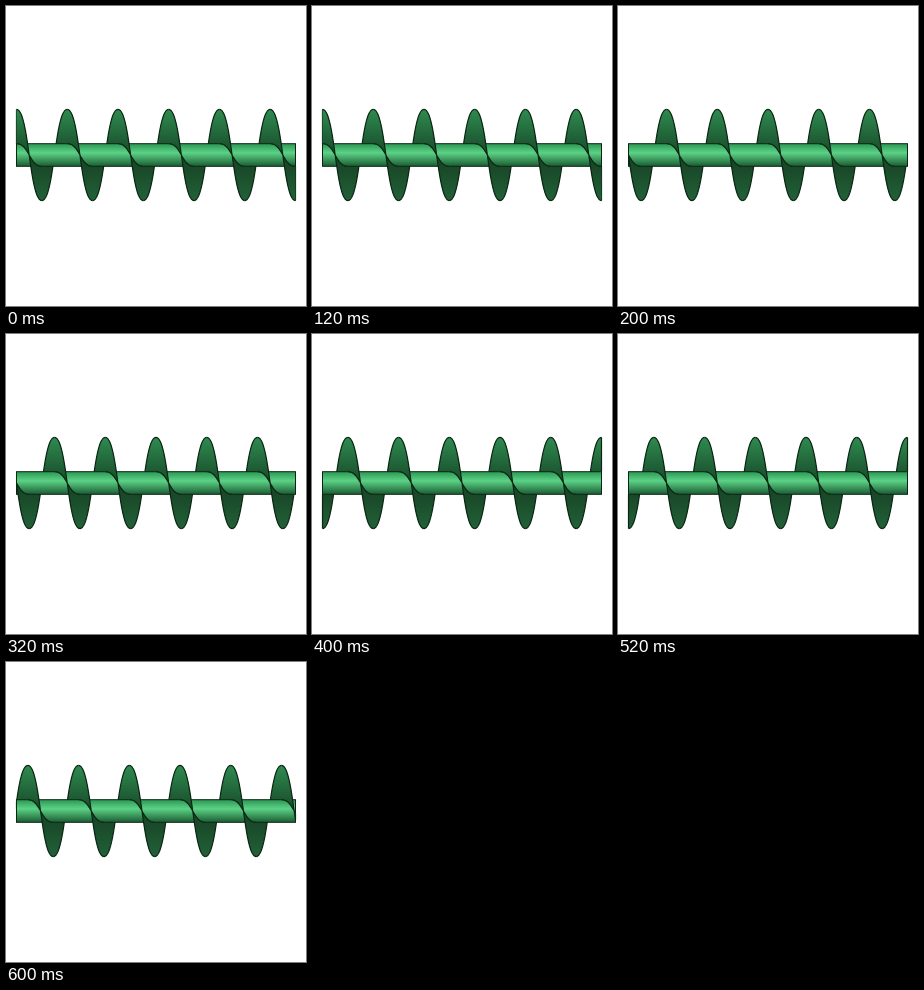
Recreate the animation shown at these times as an HTML page. Size 300 by 300 pixels, loop 800 ms.

```html
<!DOCTYPE html>
<html lang="en">
<head>
<meta charset="utf-8">
<title>Rotating screw</title>
<style>
  html, body { margin: 0; width: 100%; height: 100%; overflow: hidden; background: #fff; }
  svg { display: block; width: 100%; height: 100%; }
  .line { fill: none; stroke: #0a2613; stroke-width: 1.2; stroke-linejoin: round; }
</style>
</head>
<body>
<svg viewBox="0 0 300 300">
  <defs>
    <linearGradient id="blade" gradientUnits="userSpaceOnUse" x1="0" y1="103" x2="0" y2="195">
      <stop offset="0" stop-color="#2f8b50"/>
      <stop offset=".38" stop-color="#1d5832"/>
      <stop offset=".52" stop-color="#184527"/>
      <stop offset=".64" stop-color="#194929"/>
      <stop offset="1" stop-color="#226138"/>
    </linearGradient>
    <linearGradient id="metal" x1="0" y1="0" x2="0" y2="1">
      <stop offset="0" stop-color="#2b9653"/>
      <stop offset=".4" stop-color="#5cd286"/>
      <stop offset="1" stop-color="#1b5c33"/>
    </linearGradient>
  </defs>
  <path id="backFill" fill="url(#blade)"/>
  <path id="backLine" class="line"/>
  <rect x="10.5" y="137.7" width="279" height="22.6" fill="url(#metal)" stroke="#0a2613"/>
  <path id="frontFill" fill="url(#blade)"/>
  <path id="frontLine" class="line"/>
</svg>
<script>
  const LEFT = 10.5, RIGHT = 289.5, AXIS = 149;
  const PITCH = (RIGHT - LEFT) / 5.5;
  const OUTER = 45.6, INNER = 11.3;
  const LOOP = 800, HOLD = 200;
  const SHIFTS = [0, 0.25, 0.5, 0.776]; // turns completed at each step
  const el = id => document.getElementById(id);

  // Height (1 to -1) of an S-curve with flat ends, at u from 0 to 1.
  function slope(u) {
    let low = 0, high = 1;
    for (let i = 0; i < 14; i++) {
      const t = (low + high) / 2;
      if (1.5 * t * (1 - t) + t ** 3 < u) low = t; else high = t;
    }
    const t = (low + high) / 2;
    return 1 - 2 * t * t * (3 - 2 * t);
  }

  function wave(turns) {
    const u = 2 * (turns - Math.floor(turns));
    return slope(u < 1 ? u : 2 - u);
  }

  // Points of a helix edge seen from the side, between two x positions.
  function edge(radius, from, to, offset) {
    const n = Math.max(1, Math.ceil(to - from));
    return Array.from({ length: n + 1 }, (_, i) => {
      const x = from + (to - from) * i / n;
      const y = AXIS - radius * wave((x - offset) / PITCH);
      return x.toFixed(2) + ' ' + y.toFixed(2);
    });
  }

  const open = points => 'M' + points.join('L');

  function strip(from, to, offset) {
    const rim = edge(OUTER, from, to, offset);
    const root = edge(INNER, from, to, offset);
    return { rim, root, area: open(rim.concat(root.slice().reverse())) + 'Z' };
  }

  function draw(turn) {
    const offset = LEFT - turn * PITCH;
    const whole = strip(LEFT, RIGHT, offset);
    let backLine = open([whole.rim[0], whole.root[0]]) +
      open([whole.rim.at(-1), whole.root.at(-1)]);
    let frontFill = '', frontLine = '';

    for (let half = 0; half < 13; half++) {
      const start = offset + half * PITCH / 2;
      const from = Math.max(LEFT, start);
      const to = Math.min(RIGHT, start + PITCH / 2);
      if (to - from < 0.01) continue;
      const part = strip(from, to, offset);
      if (half % 2) {
        backLine += open(part.rim);
      } else {
        frontFill += part.area;
        frontLine += open(part.rim) + open(part.root);
      }
    }

    el('backFill').setAttribute('d', whole.area);
    el('backLine').setAttribute('d', backLine);
    el('frontFill').setAttribute('d', frontFill);
    el('frontLine').setAttribute('d', frontLine);
  }

  const begin = performance.now();
  function tick(now) {
    const time = Math.max(0, now - begin) % LOOP;
    draw(SHIFTS[Math.floor(time / HOLD)]);
    requestAnimationFrame(tick);
  }
  tick(begin);
</script>
</body>
</html>
```
